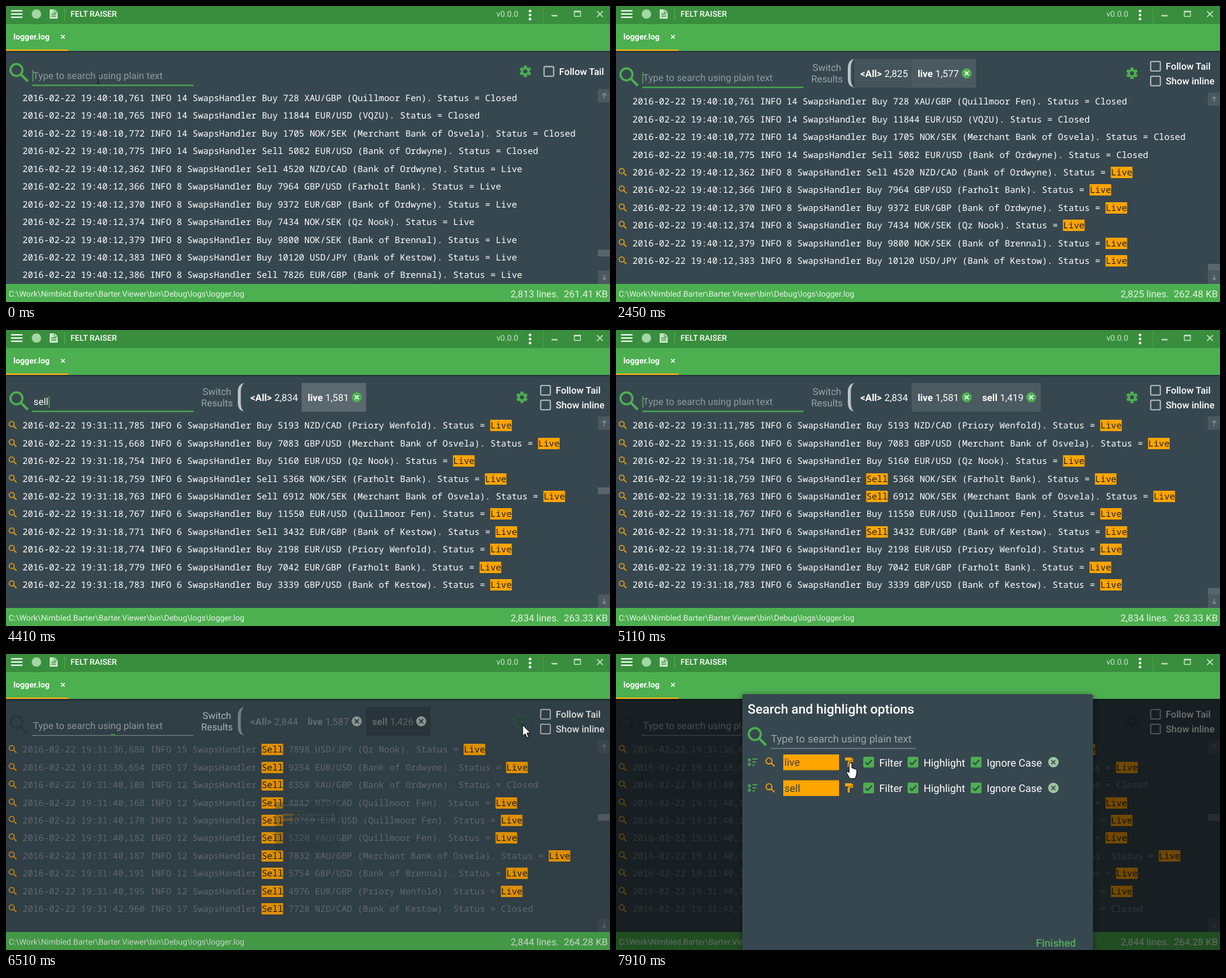
Recreate the animation shown at these times as an HTML page with a canvas. Size 899 by 442 pixels, loop 8 s.

```html
<!DOCTYPE html>
<html lang="en">
<head>
<meta charset="utf-8">
<title>Log viewer</title>
<style>
html, body { margin: 0; width: 100%; height: 100%; overflow: hidden; background: #37474f; }
canvas { display: block; width: 899px; height: 442px; }
</style>
</head>
<body>
<canvas id="stage"></canvas>
<script>
const W = 899, H = 442, LOOP = 8000;
const BG = '#37474f', GREEN = '#4caf50', DARK = '#388e3c', PALE = '#c8e6c9';
const ORANGE = '#ffa500', RED = '#f44336', WHITE = '#fff', GREY = '#8f9a9f';
const FADED = '#2c4143';
const MONO = '"Noto Sans Mono", monospace', SANS = 'Roboto, sans-serif';
const CELL = 7.915, LEFT = 24.5, PITCH = 26.45;

const canvas = document.getElementById('stage');
const ctx = canvas.getContext('2d');
const dpr = window.devicePixelRatio || 1;
canvas.width = W * dpr;
canvas.height = H * dpr;

const BANKS = {
  Q: 'Quillmoor Fen', V: 'VQZU', M: 'Merchant Bank of Osvela', O: 'Bank of Ordwyne',
  F: 'Farholt Bank', Z: 'Qz Nook', B: 'Bank of Brennal', K: 'Bank of Kestow', P: 'Priory Wenfold'
};

// Each entry: time, thread, deal, bank key, status key
const expand = rows => rows.map(row => {
  const [time, thread, deal, bank, status] = row.split('|');
  return `2016-02-22 19:${time} INFO ${thread} SwapsHandler ${deal} (${BANKS[bank]}). Status = ${status === 'C' ? 'Closed' : 'Live'}`;
});

const TAIL = expand([
  '40:10,761|14|Buy 728 XAU/GBP|Q|C', '40:10,765|14|Buy 11844 EUR/USD|V|C',
  '40:10,772|14|Buy 1705 NOK/SEK|M|C', '40:10,775|14|Sell 5082 EUR/USD|O|C',
  '40:12,362|8|Sell 4520 NZD/CAD|O|L', '40:12,366|8|Buy 7964 GBP/USD|F|L',
  '40:12,370|8|Buy 9372 EUR/GBP|O|L', '40:12,374|8|Buy 7434 NOK/SEK|Z|L',
  '40:12,379|8|Buy 9800 NOK/SEK|B|L', '40:12,383|8|Buy 10120 USD/JPY|K|L',
  '40:12,386|8|Sell 7826 EUR/GBP|B|L'
]);
const LIVE = expand([
  '31:11,785|6|Buy 5193 NZD/CAD|P|L', '31:15,668|6|Buy 7083 GBP/USD|M|L',
  '31:18,754|6|Buy 5160 EUR/USD|Z|L', '31:18,759|6|Sell 5368 NOK/SEK|F|L',
  '31:18,763|6|Sell 6912 NOK/SEK|M|L', '31:18,767|6|Buy 11550 EUR/USD|Q|L',
  '31:18,771|6|Sell 3432 EUR/GBP|K|L', '31:18,774|6|Buy 2198 EUR/USD|P|L',
  '31:18,779|6|Buy 7042 EUR/GBP|F|L', '31:18,783|6|Buy 3339 GBP/USD|K|L'
]);
const SELL = expand([
  '31:36,688|15|Sell 7898 USD/JPY|Z|L', '31:38,654|17|Sell 9254 EUR/USD|O|L',
  '31:40,108|12|Sell 8358 XAU/GBP|O|C', '31:40,168|12|Sell 4842 NZD/CAD|Q|L',
  '31:40,178|12|Sell 10769 EUR/USD|Q|L', '31:40,182|12|Sell 5220 XAU/GBP|Q|L',
  '31:40,187|12|Sell 7832 XAU/GBP|M|L', '31:40,191|12|Sell 5754 GBP/USD|B|L',
  '31:40,195|12|Sell 4976 EUR/GBP|P|L', '31:42,960|17|Sell 7728 NZD/CAD|K|C'
]);

// Timelines: [start, value, ...]
const STATS = [
  [0, '2,813', '261.41'], [1050, '2,819', '261.87'], [1190, '2,822', '262.11'],
  [2170, '2,825', '262.48', '1,577'], [3850, '2,828', '262.75', '1,578'],
  [4340, '2,834', '263.33', '1,581', '1,419'], [5670, '2,839', '263.80', '1,584', '1,423'],
  [6160, '2,844', '264.28', '1,587', '1,426']
];
const TYPED = [
  [0, ''], [910, 'l'], [1330, 'li'], [1470, 'liv'], [1680, 'live'], [2100, ''],
  [3710, 's'], [3990, 'se'], [4130, 'sel'], [4340, 'sell'], [4830, '']
];
const CARET = [[0, 1], [210, 0], [700, 1], [3150, 0], [3710, 1], [5320, 0], [5810, 1], [6230, 0]];
const THUMB = [[0, 364], [2100, 385], [2590, 235], [4900, 385], [5460, 239]];
const ROWS = [[0, TAIL], [2590, LIVE], [5320, SELL]];
const MOVES = [
  [5460, 140, 104], [5740, 420, 52], [6020, 634, 50], [6230, 769, 106],
  [7070, 769, 106], [7450, 430, 135], [7640, 297, 176], [7840, 349, 163]
];

const at = (list, t) => list.filter(e => e[0] <= t).pop();
const ramp = (t, a, b) => Math.min(1, Math.max(0, (t - a) / (b - a)));
const cubic = p => p < .5 ? 4 * p ** 3 : 1 - 4 * (1 - p) ** 3;

function text(s, x, y, size = 14.3, color = WHITE, weight = 400, family = SANS) {
  ctx.font = `${weight} ${size}px ${family}`;
  ctx.fillStyle = color;
  ctx.fillText(s, x, y);
}
function textWidth(s, size, weight = 400) {
  ctx.font = `${weight} ${size}px ${SANS}`;
  return ctx.measureText(s).width;
}
function rect(x, y, w, h, color) {
  ctx.fillStyle = color;
  ctx.fillRect(x, y, w, h);
}
function disc(x, y, r, color) {
  ctx.fillStyle = color;
  ctx.beginPath();
  ctx.arc(x, y, r, 0, Math.PI * 2);
  ctx.fill();
}
function trace(points, ox = 0, oy = 0) {
  ctx.beginPath();
  points.forEach(([x, y], i) => i ? ctx.lineTo(ox + x, oy + y) : ctx.moveTo(ox + x, oy + y));
}
function line(points, color, width = 1, ox = 0, oy = 0) {
  trace(points, ox, oy);
  ctx.strokeStyle = color;
  ctx.lineWidth = width;
  ctx.stroke();
}
function cross(x, y, r, color, width) {
  line([[-r, -r], [r, r]], color, width, x, y);
  line([[-r, r], [r, -r]], color, width, x, y);
}
function withAlpha(a, draw) {
  ctx.save();
  ctx.globalAlpha *= a;
  draw();
  ctx.restore();
}

// Magnifier whose box has its top left at x, y
function lens(x, y, size, color) {
  const k = size / 17.5;
  ctx.strokeStyle = color;
  ctx.lineWidth = 2 * k;
  ctx.beginPath();
  ctx.arc(x + 6.5 * k, y + 6.5 * k, 5.5 * k, 0, Math.PI * 2);
  ctx.stroke();
  line([[10.6 * k, 10.6 * k], [16.8 * k, 16.8 * k]], color, 2.2 * k, x, y);
}
function gear(x, y, color) {
  ctx.save();
  ctx.translate(x, y);
  for (let i = 0; i < 3; i++) {
    rect(-2.3, -8.6, 4.6, 17.2, color);
    ctx.rotate(Math.PI / 3);
  }
  ctx.restore();
  disc(x, y, 6.4, color);
  disc(x, y, 3, BG);
}
function checkbox(x, y, label, baseline) {
  ctx.strokeStyle = '#b4bcc0';
  ctx.lineWidth = 1.8;
  ctx.beginPath();
  ctx.roundRect(x - 7.2, y - 7.2, 14.4, 14.4, 1.5);
  ctx.stroke();
  text(label, x + 15.3, baseline, 14.1, WHITE, 500);
}
function ticked(x, y, label) {
  ctx.fillStyle = GREEN;
  ctx.beginPath();
  ctx.roundRect(x - 8, y - 8, 16, 16, 2);
  ctx.fill();
  line([[-4.8, .2], [-1.5, 3.5], [5, -3.5]], BG, 2, x, y);
  text(label, x + 15.7, y + 6, 15.5);
}

function header() {
  rect(0, 0, W, 27, DARK);
  rect(0, 27, W, 40, GREEN);
  for (const y of [6.3, 11, 15.8]) rect(7.5, y, 17, 1.9, WHITE);
  disc(45.3, 12, 7, '#a5d6a7');
  trace([[65, 5], [72.5, 5], [77, 9.5], [77, 19], [65, 19]]);
  ctx.fillStyle = PALE;
  ctx.fill();
  for (const y of [11.2, 14.4]) rect(67.5, y, 7, 1.4, DARK);
  line([[72, 5.5], [72, 10], [76.5, 10]], DARK, 1);
  rect(87, 3, 1, 19, '#5aa65d');
  text('FELT RAISER', 96, 16.3, 12, WHITE, 500);
  text('v0.0.0', 730, 16.2, 12, PALE);
  for (const y of [7.5, 13.5, 19.5]) disc(780, y, 2, WHITE);
  rect(799, 0, 1, 26, '#4d9c50');
  rect(812, 13.5, 9, 2, PALE);
  ctx.strokeStyle = PALE;
  ctx.lineWidth = 1.2;
  ctx.strokeRect(846, 8, 9, 7.5);
  rect(845.5, 7.4, 10, 2, PALE);
  cross(884, 12, 4.3, PALE, 1.5);
  text('logger.log', 11, 50.2, 12, WHITE, 700);
  cross(84.7, 46, 2.7, WHITE, 1.3);
  rect(0, 65, 93, 2, '#ffb010');
  const shade = ctx.createLinearGradient(0, 67, 0, 71);
  shade.addColorStop(0, 'rgba(0,0,0,.28)');
  shade.addColorStop(1, 'rgba(0,0,0,0)');
  rect(0, 67, W, 4, shade);
}

function footer(stat) {
  rect(0, 415, W, 27, GREEN);
  text('C:\\Work\\Nimbled.Barter\\Barter.Viewer\\bin\\Debug\\logs\\logger.log', 4, 434.3, 12, '#e4f4e5');
  text(`${stat[1]} lines.  ${stat[2]} KB`, 751, 435, 14.3, '#e4f4e5');
}

function searchBox(t, wide, off) {
  const typed = at(TYPED, t)[1];
  const bad = typed.length > 0 && typed.length < 3;
  const dy = wide ? 3 : 0;
  const tint = bad ? RED : GREEN;
  lens(5, wide ? 91.5 : 85, 28.5, off ? FADED : tint);
  if (typed) text(typed, 41, 109 + dy);
  else text('Type to search using plain text', 40.3, 109 + dy, 14.3, off ? '#a3adb1' : GREY);
  if (bad) {
    const start = t < 2000 ? 910 : 3710;
    withAlpha(ramp(t, start - 70, start + 140), () =>
      text('Text must be at least 3 characters', 40.3, 88 + dy, 12, RED));
  }
  if (off) {
    rect(39, 121, 240, 1, '#8a969b');
    const half = 120 * (1 - ramp(t, 6365, 6515));
    rect(159 - half, 119.5, half * 2, 2, GREEN);
  } else {
    rect(39, 117.5 + dy, 240, 2, tint);
  }
  if (at(CARET, t)[1]) {
    const x = typed ? 41.5 + textWidth(typed, 14.3) : 39.3;
    rect(x, 96 + dy, 1.4, 17, tint);
  }
}

function chip(x, w, label, count, lit, off, pad) {
  rect(x, 79, w, 43, off && lit ? 'rgba(0,0,0,.16)' : `rgba(255,255,255,${lit})`);
  withAlpha(off ? .3 : 1, () => {
    text(label, x + pad, 106, 14.3, WHITE, 700);
    text(count, x + pad + textWidth(label, 14.3, 700) + 3.8, 106);
  });
  if (label === '<All>') return;
  disc(x + 82, 100.5, 7.5, off ? '#9aa9a5' : GREEN);
  cross(x + 82, 100.5, 3, off ? '#2b383e' : WHITE, 1.7);
}

function switcher(t, stat, off) {
  withAlpha(.25 + .75 * ramp(t, 2100, 2400), () => {
    const tone = off ? '#c3d3d6' : '#9ba5a9';
    text('Switch', 292.5, 97, 14.3, tone);
    text('Results', 290.5, 114, 14.3, tone);
    ctx.fillStyle = off ? '#84919a' : '#bcc4c7';
    ctx.beginPath();
    ctx.moveTo(354.5, 79);
    ctx.quadraticCurveTo(345, 81, 345, 92);
    ctx.lineTo(345, 109);
    ctx.quadraticCurveTo(345, 120, 354.5, 122);
    ctx.quadraticCurveTo(349.5, 118, 349.5, 109);
    ctx.lineTo(349.5, 92);
    ctx.quadraticCurveTo(349.5, 83, 354.5, 79);
    ctx.fill();
    const soft = .1, full = .18;
    chip(355, 85, '<All>', stat[1], t < 2590 ? .07 : 0, off, 8.8);
    const live = t < 2590 || t >= 4830 ? soft : full;
    chip(440, 96, 'live', stat[3] || '1,577', t < 5320 ? live : 0, off, 9);
  });
  if (t >= 4830) {
    withAlpha(.25 + .75 * ramp(t, 4830, 5060), () =>
      chip(536, 96, 'sell', stat[4], t < 5320 ? .1 : .18, off, 9));
  }
}

function logRows(t, wide, off) {
  const marks = t >= 4830 ? ['Live', 'Sell'] : wide ? ['Live'] : [];
  at(ROWS, t)[1].slice(0, wide ? 10 : 11).forEach((row, i) => {
    const mid = Math.round((wide ? 142.2 : 136.9) + i * PITCH);
    let hit = false;
    for (const { 0: word, index } of row.matchAll(/\S+/g)) {
      const x = LEFT + index * CELL;
      const marked = marks.includes(word);
      if (marked) {
        hit = true;
        rect(x - .3, mid - 8, word.length * CELL + .4, 17, ORANGE);
      }
      withAlpha(off && !marked ? .27 : 1, () =>
        text(word, x, mid + 5, 13.19, marked ? '#1f1f1a' : WHITE, 500, MONO));
    }
    if (hit) lens(4, mid - 6, 12, ORANGE);
  });
}

function scrollbar(t, wide, off) {
  withAlpha(off ? .55 : 1, () => {
    const top = wide ? 129 : 124;
    rect(881, top, 18, 20, '#4b585f');
    rect(881, 395, 18, 20, '#4b585f');
    const tone = '#87939a';
    line([[0, 4], [0, -4]], tone, 1.2, 890.5, top + 10.5);
    line([[-3, -1], [0, -4], [3, -1]], tone, 1.2, 890.5, top + 10.5);
    line([[0, -4], [0, 4]], tone, 1.2, 890.5, 405);
    line([[-3, 1], [0, 4], [3, 1]], tone, 1.2, 890.5, 405);
  });
  rect(881, at(THUMB, t)[1], 18, 10, '#59656c');
}

function optionRow(y, word) {
  line([[198.5, y - 5], [198.5, y + 5]], GREEN, 1.4);
  line([[196, y - 2.5], [198.5, y - 5], [201, y - 2.5]], GREEN, 1.3);
  line([[196, y + 2.5], [198.5, y + 5], [201, y + 2.5]], GREEN, 1.3);
  [7.5, 5.5, 3.5].forEach((w, i) => rect(203, y - 5.5 + i * 4.6, w, 1.6, GREEN));
  lens(222.5, y - 7, 14, ORANGE);
  rect(249, y - 11.5, 83, 23.5, ORANGE);
  text(word, 250.5, y + 5.5, 15.5, '#3a3f38');
  rect(341, y - 7, 9.5, 4.6, ORANGE);
  line([[350, y - 5], [352, y - 5], [352, y - 1], [346.2, y - 1], [346.2, y + 1]], ORANGE, 1.4);
  rect(344.8, y, 2.9, 7, ORANGE);
  ticked(376, y, 'Filter');
  ticked(442, y, 'Highlight');
  ticked(536, y, 'Ignore Case');
  disc(651, y, 7.8, '#9cc5a0');
  cross(651, y, 3, BG, 1.6);
}

function dialog(t) {
  const p = ramp(t, 6360, 6780);
  if (p <= 0) return;
  rect(0, 67, W, H - 67, `rgba(0,0,0,${.56 * p ** 1.4})`);
  const k = cubic(p);
  ctx.save();
  ctx.globalAlpha = Math.min(1, p * p * 1.8);
  ctx.translate(449, 258);
  ctx.scale(k, k);
  ctx.translate(-449, -258);
  ctx.shadowColor = 'rgba(0,0,0,.5)';
  ctx.shadowBlur = 10 * k * dpr;
  ctx.shadowOffsetY = 2 * k * dpr;
  ctx.fillStyle = BG;
  ctx.beginPath();
  ctx.roundRect(188, 60, 522, 396, 3);
  ctx.fill();
  ctx.shadowColor = 'transparent';
  text('Search and highlight options', 196, 89, 19.4, WHITE, 500);
  lens(196, 109, 28.5, GREEN);
  text('Type to search using plain text', 230.8, 132.3, 15.5, '#9ca6aa');
  rect(230, 140.5, 216, 1, '#939da2');
  optionRow(161.5, 'live');
  optionRow(200, 'sell');
  text('Finished', 625, 437.3, 15.7, GREEN, 500);
  ctx.restore();
}

const ARROW = [[0, 0], [0, 16.5], [3.8, 13], [6.3, 18.8], [8.8, 17.7], [6.3, 12], [11.5, 12]];
const HAND = [[-2, 1], [0, -1], [2, 1], [2, 7], [8, 9], [9.5, 11], [9, 17], [7, 23], [-1, 23], [-6, 14], [-5, 12], [-2, 14]];

function pointer(t) {
  if (t < 910) {
    line([[134.5, 101.5], [140, 101.5]], '#1a2226', 1);
    line([[134.5, 115.5], [140, 115.5]], '#1a2226', 1);
    line([[137.3, 101.5], [137.3, 115.5]], '#1a2226', 1.2);
    return;
  }
  if (t < MOVES[0][0]) return;
  const from = at(MOVES, t);
  const to = MOVES[MOVES.indexOf(from) + 1] || from;
  const p = to === from ? 0 : ramp(t, from[0], to[0]);
  const x = from[1] + (to[1] - from[1]) * p;
  const y = from[2] + (to[2] - from[2]) * p;
  ctx.lineJoin = 'round';
  trace(t >= 7910 ? HAND : ARROW, x, y);
  ctx.closePath();
  ctx.fillStyle = '#fff';
  ctx.strokeStyle = '#000';
  ctx.lineWidth = 1;
  ctx.fill();
  ctx.stroke();
  ctx.lineJoin = 'miter';
}

function draw(t) {
  const wide = t >= 2100, off = t >= 6370;
  const stat = at(STATS, t);
  ctx.setTransform(dpr, 0, 0, dpr, 0, 0);
  ctx.textRendering = 'geometricPrecision';
  rect(0, 0, W, H, BG);
  header();
  searchBox(t, wide, off);
  if (wide) {
    switcher(t, stat, off);
    gear(768, 100.5, off ? FADED : GREEN);
    if (off) withAlpha(.1 * (1 - ramp(t, 6510, 6790)), () => disc(767, 102, 12, GREEN));
    checkbox(803, 90, 'Follow Tail', 95);
    checkbox(803, 112, 'Show inline', 117);
  } else {
    gear(773, 97.5, GREEN);
    checkbox(808, 97.7, 'Follow Tail', 103);
  }
  logRows(t, wide, off);
  scrollbar(t, wide, off);
  footer(stat);
  dialog(t);
  pointer(t);
}

function tick() {
  draw(performance.now() % LOOP);
  requestAnimationFrame(tick);
}
tick();
</script>
</body>
</html>
```
